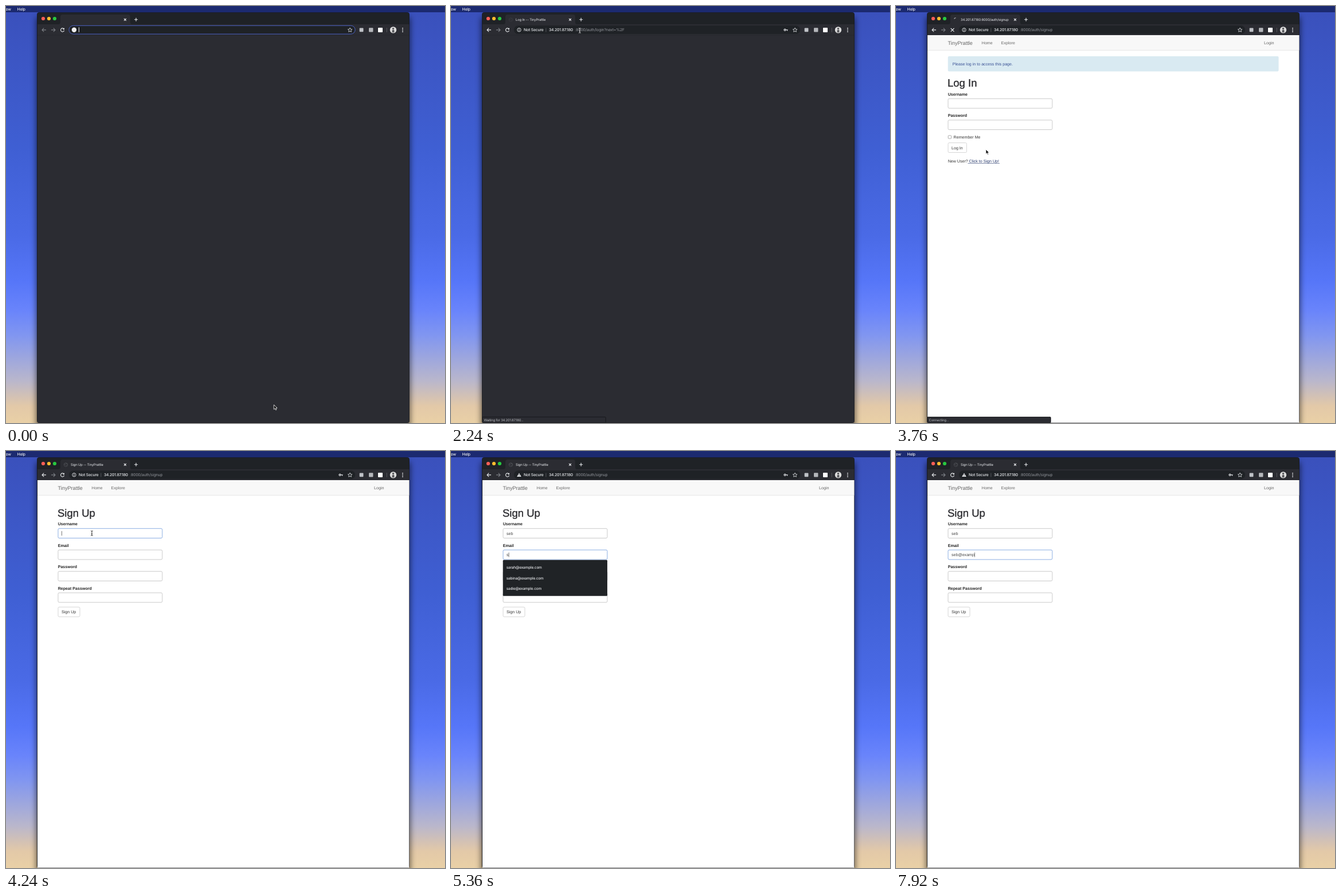
Write an HTML page that moves like this. It is 767 by 730 pixels and loops after 8000 ms.

```html
<!DOCTYPE html>
<html lang="en">
<head>
<meta charset="utf-8">
<title>Sign up</title>
<style>
html, body { margin: 0; width: 100%; height: 100%; overflow: hidden; background: #3a52bd; }
svg { display: block; width: 100%; height: 100%; }
text { white-space: pre; text-rendering: geometricPrecision; }
.ui { font-family: Inter, Roboto, sans-serif; letter-spacing: -.03em; font-size: 6.9px; fill: #e8eaed; }
.small { font-size: 5.9px; }
.medium { font-weight: 500; }
.page { font-family: "Liberation Sans", Arial, sans-serif; font-size: 7.1px; fill: #333; }
.bold { font-weight: 700; fill: #222; }
.head { font-size: 18.5px; fill: #2b2b2f; stroke: #2b2b2f; stroke-width: .35px; }
.line { fill: none; stroke: #e8eaed; stroke-width: 1.1; }
.dim { stroke: #7d8086; }
</style>
</head>
<body>
<svg id="stage" viewBox="0 0 767 730" xmlns="http://www.w3.org/2000/svg"></svg>
<script>
const LOOP = 8000, STEP = 80;
const SITE = 'TinyPrattle', HOST = '34.201.87.180', PORT = ':8000';
const stage = document.getElementById('stage');

const rect = (x, y, w, h, fill, more = '') =>
  `<rect x="${x}" y="${y}" width="${w}" height="${h}" fill="${fill}" ${more}/>`;
const circle = (x, y, r, fill, more = '') =>
  `<circle cx="${x}" cy="${y}" r="${r}" fill="${fill}" ${more}/>`;
const path = (d, cls = 'line', more = '') => `<path d="${d}" class="${cls}" ${more}/>`;
const text = (x, y, str, cls, more = '') =>
  `<text x="${x}" y="${y}" class="${cls}" ${more}>${str}</text>`;
const group = (id, body) => `<g id="${id}">${body}</g>`;
const input = (y, id = '') =>
  rect(91, y, 182, 16.8, '#fff', `id="${id}" rx="2" stroke="#c4c4c4" stroke-width=".9"`);
const button = (y, w, label) =>
  rect(91, y, w, 17, '#fff', 'rx="2" stroke="#ccc" stroke-width=".8"') + text(97, y + 11.2, label, 'page');
const label = (y, str) => text(90.7, y, str, 'page bold');
const globe = (x, y, color) =>
  circle(x, y, 3.2, 'none', `stroke="${color}" stroke-width=".8"`) +
  path(`M${x - 3} ${y - 1}q2 0 3 1.5t2 1.5M${x} ${y - 3}q0 2 3 2`, '', `fill="none" stroke="${color}" stroke-width=".8"`);

function wallpaper() {
  const stops = [[0, '#3a50bb'], [.34, '#3f5fd3'], [.55, '#4a6ae6'], [.66, '#5676f8'], [.73, '#6984fb'],
    [.79, '#8196f0'], [.85, '#a0a8dc'], [.9, '#bab7cb'], [.935, '#d2c1b5'], [.96, '#e3c9a8'], [1, '#e9d0a6']];
  return `<defs><linearGradient id="sky" x2="0" y2="1">` +
    stops.map(([o, c]) => `<stop offset="${o}" stop-color="${c}"/>`).join('') +
    `</linearGradient><filter id="blur" x="-10%" width="120%"><feGaussianBlur stdDeviation="5.5"/></filter></defs>` +
    rect(0, 0, 767, 730, 'url(#sky)') +
    rect(53, 20, 653, 740, '#000', 'opacity=".6" filter="url(#blur)"') +
    rect(0, 0, 767, 11, '#1c2a70') +
    text(-0.5, 7.6, 'ow', 'ui medium') + text(19.5, 7.6, 'Help', 'ui medium');
}

function browser() {
  const lights = ['#ff5f57', '#febc2e', '#28c840'].map((c, i) => circle(65 + i * 10, 22, 3.1, c)).join('');
  const dots = [39, 42, 45].map(y => circle(693, y, .9, '#e8eaed')).join('');
  return rect(54.5, 11.5, 650, 718, '#1f2226', 'rx="3" stroke="#15171c" stroke-width=".8"') + lights +
    rect(55, 32, 649.3, 697, '#2b2c32') +
    path('M92 32q3 0 3-4v-9q0-4 4-4h114q4 0 4 4v9q0 4 3 4z', '', 'fill="#2b2c32"') +
    path('M206.2 22l3.8 3.8m0-3.8l-3.8 3.8M227.2 20.8v6m-3-3h6') +
    rect(55, 50.6, 649.3, .8, '#25262b') +
    path('M70 41.9h-7m3.2-3.2l-3.2 3.2l3.2 3.2', 'line', 'id="back"') +
    path('M79 41.9h7m-3.2-3.2l3.2 3.2l-3.2 3.2', 'line dim') +
    group('reload', path('M101.2 40.2a3.1 3.1 0 1 0 .4 2.7') + path('M102 38.3v3h-3z', '', 'fill="#e8eaed"')) +
    group('stop', path('M95.7 39l5.8 5.8m0-5.8l-5.8 5.8')) +
    rect(110, 34.3, 500, 14.8, '#1f2226', 'rx="7.4" id="bar"') +
    group('blank', circle(119, 41.8, 4.2, '#eee')) +
    group('info', circle(119, 41.8, 3.2, 'none', 'stroke="#e8eaed" stroke-width=".9"') +
      path('M119 41.2v2.4M119 39.5v.9')) +
    group('warn', path('M119 38.4l3.8 6.6h-7.6z', '', 'fill="#e8eaed"') +
      path('M119 40.5v2.2M119 43.3v.9', '', 'stroke="#1f2226" stroke-width=".8"')) +
    group('insecure', text(127, 44.2, 'Not Secure', 'ui medium') + rect(165.6, 38.5, .7, 7, '#6b6e74')) +
    text(171, 44.2, HOST, 'ui medium', 'id="host"') +
    text(216.5, 44.2, '', 'ui', 'id="path" style="fill:#92959b"') +
    rect(127, 37.3, .9, 8.6, '#fff', 'id="barCaret"') +
    group('key', circle(583.4, 41.8, 1.5, 'none', 'stroke="#e8eaed" stroke-width="1.2"') +
      path('M585 41.8h3.6m-1.1 0v1.7')) +
    path('M601 38.2l1.1 2.4 2.6.3-1.9 1.8.5 2.6-2.3-1.3-2.3 1.3.5-2.6-1.9-1.8 2.6-.3z', 'line', 'stroke-width=".8" style="stroke-width:.8"') +
    rect(617.6, 38.6, 6.8, 6.6, '#bfc2c7', 'rx="1"') + rect(634, 38.2, 7.4, 7.4, '#b5b7bb', 'rx="1"') +
    rect(650, 38, 8, 8, '#fff', 'rx="1"') + rect(664.8, 38, .8, 8, '#606369') +
    circle(676.5, 41.9, 5.7, '#dcdcdc') + circle(676.5, 39.6, 1.7, '#55565a') +
    path('M674.6 46.2v-2.6q0-2 1.9-2t1.9 2v2.6z', '', 'fill="#55565a"') + dots +
    text(113, 26, '', 'ui small', 'id="title"') + group('icon', globe(104.5, 24, '#515459')) +
    group('spinner', path('M101.6 22.6a3.2 3.2 0 0 1 2.9-1.8', 'line', 'style="stroke:#c6c9ce"'));
}

const nav = () => rect(55, 51, 649.3, 678.5, '#fff') + rect(55, 51, 649.3, 26, '#f8f8f8') +
  rect(55, 77, 649.3, .8, '#e2e2e2') +
  text(90.6, 67.6, SITE, 'page', 'style="font-size:9.13px;fill:#666"') +
  [[149.8, 'Home'], [183.8, 'Explore'], [643, 'Login']]
    .map(([x, s]) => text(x, 67.1, s, 'page', 'style="fill:#666"')).join('');

const login = () => nav() + rect(90.7, 88, 577.8, 26.5, '#d9eaf2', 'rx="2"') +
  text(98.7, 103.6, 'Please log in to access this page.', 'page', 'style="fill:#374f94"') +
  text(90, 141.2, 'Log In', 'page head') +
  label(156.8, 'Username') + input(162.2) + label(194.4, 'Password') + input(199.7) +
  rect(91.2, 226.7, 5.4, 5.4, '#fff', 'rx="1" stroke="#888" stroke-width=".7"') +
  text(100.6, 232, 'Remember Me', 'page') + button(239.5, 32.5, 'Log In') +
  text(90.7, 274.4, 'New User?', 'page') +
  text(127.5, 274.4, 'Click to Sign Up!', 'page', 'id="link"') +
  rect(125.5, 275.2, 55.5, .6, '#26386b', 'id="underline"');

const signup = () => nav() + text(90, 114.8, 'Sign Up', 'page head') +
  label(130.4, 'Username') + input(135.7, 'userBox') + label(167.9, 'Email') + input(173.2, 'mailBox') +
  label(205.4, 'Password') + input(210.7) + label(242.9, 'Repeat Password') + input(248.2) +
  button(273.2, 38, 'Sign Up') +
  text(97, 146.6, '', 'page', 'id="user" style="fill:#444"') +
  text(97, 184.1, '', 'page', 'id="mail" style="fill:#444"') +
  rect(0, 0, .6, 8, '#222', 'id="caret"') +
  group('logins', rect(90.7, 153.3, 182.4, 58.2, '#202326', 'rx="1.5"') + globe(100.5, 172, '#85888d') +
    text(110.8, 168.8, 'sabina', 'ui medium', 'style="font-size:6.4px"') +
    [0, 1, 2, 3, 4, 5].map(i => circle(112.2 + i * 2.95, 178.3, .85, '#a9abaf')).join('') +
    text(96.7, 204, 'Manage Passwords...', 'ui', 'style="font-size:6.4px;fill:#a9abaf"')) +
  group('mails', rect(90.7, 190.8, 182.4, 63, '#202326', 'rx="1.5"') +
    ['sarah', 'sabina', 'sadie'].map((n, i) =>
      text(96.7, 206.4 + i * 18.3, n + '@example.com', 'ui medium', 'style="font-size:6.5px"')).join(''));

stage.innerHTML = wallpaper() + browser() + group('login', login()) + group('signup', signup()) +
  group('status', rect(54.8, 719.5, 215.5, 10, '#2b2c32', 'stroke="#17181b" stroke-width=".9" rx="1"') +
    text(57.5, 726.8, '', 'ui small', 'id="note" style="fill:#b9bbbf"')) +
  group('arrow', path('M0 0v8.2l1.9-1.7 1.3 2.8 1.4-.6-1.3-2.8h2.6z', '', 'stroke-width=".8" stroke="#fff" fill="#111"')) +
  group('beam', path('M-1.8-4.3q1.8 0 1.8 1.2 0-1.2 1.8-1.2M0-3.2v6.4M-1.8 4.3q1.8 0 1.8-1.2 0 1.2 1.8 1.2M-1 1h2', '', 'fill="none" stroke-width=".9"'));

const el = {};
stage.querySelectorAll('[id]').forEach(n => { if (n.id) el[n.id] = n; });
const show = (id, on) => { el[id].style.display = on ? '' : 'none'; };
const write = (id, s) => { if (el[id].textContent !== s) el[id].textContent = s; };

// Pointer path: [time, x, y]
const trail = [[0, 468, 698], [160, 468, 698], [880, 225, 43], [2480, 225, 43], [3200, 157, 271],
  [3600, 157, 271], [3760, 157, 251], [4160, 150, 144], [LOOP, 150, 144]];
// Keystroke times
const userKeys = [4480, 4720, 4880];
const mailKeys = [5280, 5600, 5840, 6400, 6800, 7040, 7360, 7600, 7840];
const typed = (word, keys, t) => word.slice(0, keys.filter(k => k <= t).length);

function pointerAt(t) {
  const i = Math.max(1, trail.findIndex(p => p[0] > t));
  const [a, b] = [trail[i - 1], trail[i]];
  const u = (t - a[0]) / (b[0] - a[0]), e = u * u * (3 - 2 * u);
  return [a[1] + (b[1] - a[1]) * e, a[2] + (b[2] - a[2]) * e];
}

function drawPointer(t) {
  const [x, y] = pointerAt(t), hidden = t >= 4480;
  const inField = t >= 3920 && x > 91 && x < 273 && y > 136 && y < 153;
  const beam = y < 50 || inField;
  show('arrow', !hidden && !beam);
  show('beam', !hidden && beam);
  el.beam.firstChild.setAttribute('stroke', y < 50 ? '#ddd' : '#222');
  for (const id of ['arrow', 'beam']) el[id].setAttribute('transform', `translate(${x} ${y})`);
}

function drawBar(t) {
  const pasted = t >= 960, sent = t >= 1200, loaded = t >= 2160;
  const leaving = t >= 3600 && t < 3920;
  const busy = (sent && !loaded) || leaving;
  const warned = t >= 4640;
  el.bar.setAttribute('stroke', sent ? 'none' : '#4c62c4');
  show('barCaret', !sent);
  el.barCaret.setAttribute('x', pasted ? 193 : 127);
  show('blank', !loaded && !sent);
  show('info', sent && !warned);
  show('warn', warned);
  show('insecure', loaded);
  show('host', pasted);
  el.host.setAttribute('x', loaded ? 171 : 127);
  el.path.setAttribute('x', loaded ? 216.5 : 172.5);
  write('path', t >= 3600 ? PORT + '/auth/signup' : loaded ? PORT + '/auth/login?next=%2F' : pasted ? PORT : '');
  el.barCaret.setAttribute('x', pasted ? 191.5 : 127);
  el.back.setAttribute('class', loaded ? 'line' : 'line dim');
  show('reload', !busy);
  show('stop', busy);
  show('key', loaded && !(t >= 3600 && t < 4000));
  write('title', t >= 3920 ? 'Sign Up -- ' + SITE : leaving ? HOST + PORT + '/auth/signup' :
    loaded ? 'Log In -- ' + SITE : sent ? HOST + PORT : '');
  show('icon', loaded && !leaving);
  el.icon.setAttribute('opacity', t < 2320 ? .35 : 1);
  show('spinner', busy);
  el.spinner.setAttribute('transform', `rotate(${(3760 - t) * .3} 104.5 24)`);
  show('status', (sent && t < 2560) || leaving);
  write('note', leaving ? 'Connecting...' : `Waiting for ${HOST}...`);
}

function drawPage(t) {
  const hover = t >= 3120;
  show('login', t >= 2320 && t < 3920);
  show('signup', t >= 3920);
  show('underline', hover);
  el.link.style.fill = hover ? '#26386b' : '#3a55a5';

  const user = typed('seb', userKeys, t), mail = typed('seb@examp', mailKeys, t);
  const onMail = t >= 5120, onUser = t >= 4240 && !onMail;
  write('user', user);
  write('mail', mail);
  show('logins', user.length === 1);
  show('mails', mail.length === 1);
  el.userBox.setAttribute('stroke', onUser ? '#7fa5e0' : '#c4c4c4');
  el.mailBox.setAttribute('stroke', onMail ? '#7fa5e0' : '#c4c4c4');
  const field = onMail ? el.mail : el.user;
  show('caret', onUser || onMail);
  if (t >= 3920) el.caret.setAttribute('x', 97.2 + (field.textContent ? field.getComputedTextLength() : 0));
  el.caret.setAttribute('y', onMail ? 177.7 : 140.2);
}

function frame(now) {
  const t = Math.floor((now % LOOP) / STEP) * STEP;
  drawBar(t);
  drawPage(t);
  drawPointer(t);
  requestAnimationFrame(frame);
}
frame(0);
</script>
</body>
</html>
```
